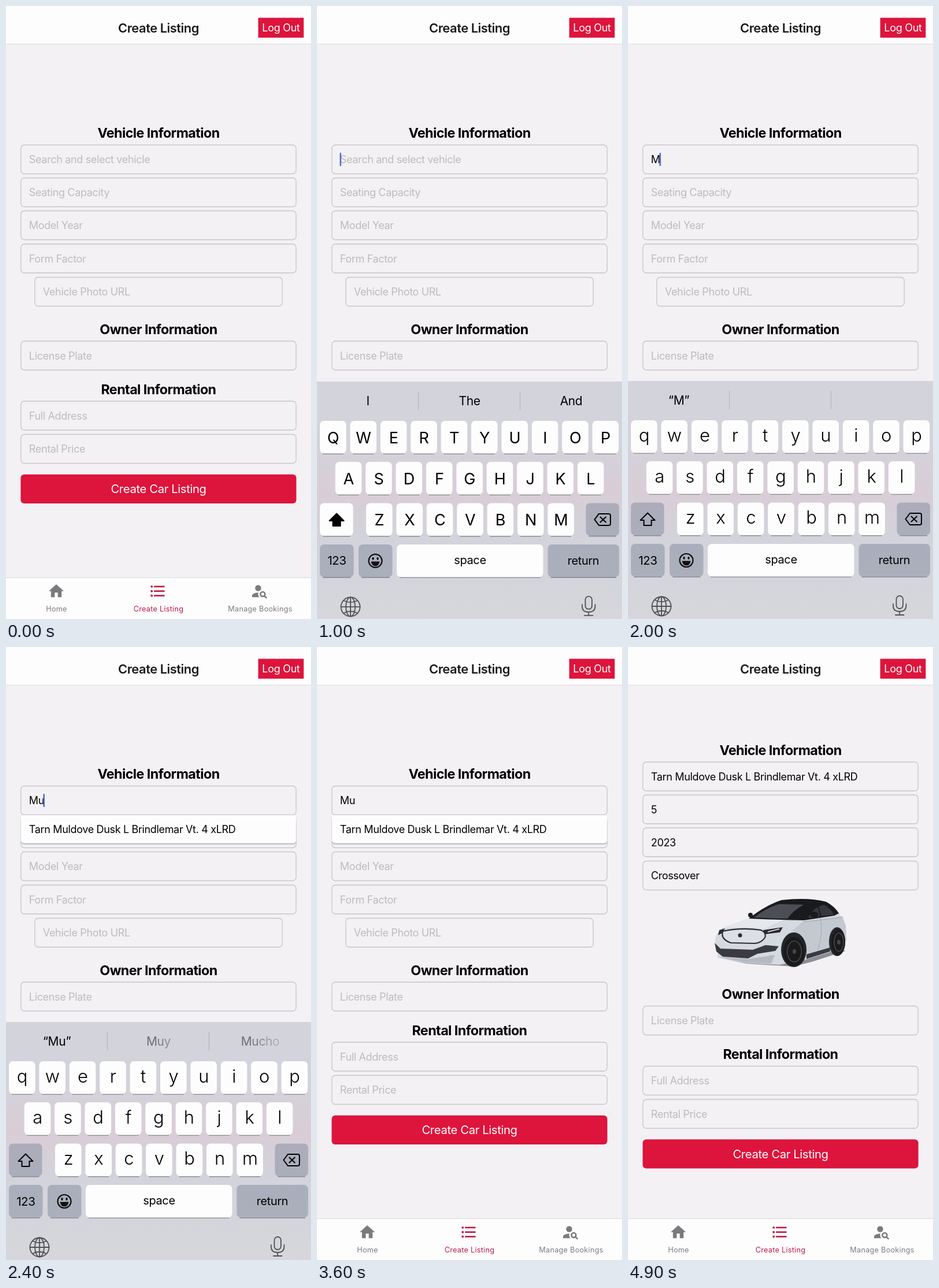
Animation, 528 px wide and 1061 px high, one loop 5000 ms. Source, as an HTML page:

```html
<!DOCTYPE html>
<html lang="en">
<head>
<meta charset="utf-8">
<title>Create Listing</title>
<style>
  html, body { margin: 0; width: 100%; height: 100%; overflow: hidden; background: #f3f1f4; }
  svg { display: block; width: 100vw; height: 100vh; }
  text { font-family: Inter, "Liberation Sans", sans-serif; letter-spacing: -.019em; white-space: pre; }
  .title { font-weight: 600; letter-spacing: -.022em; }
  .head { font-weight: 700; letter-spacing: -.025em; }
  .tab { letter-spacing: .02em; }
  .small { font-weight: 350; }
</style>
</head>
<body>
<svg id="stage" viewBox="0 0 528 1061"></svg>
<script>
const LOOP = 5000, KB_IN = 546.5, TYPE_M = 1450, TYPE_U = 2250, KB_OUT = 3050, PICK = 3800;
const KB_TOP = 649, KB_HEIGHT = 412;
const RED = '#dd143c', ACTIVE = '#bd1a42', GREY = '#7b7a7e';
const CAR = 'Tarn Muldove Dusk L Brindlemar Vt. 4 xLRD';

const clamp = v => Math.max(0, Math.min(1, v));
// Critically damped spring: 1 at the start, settling to 0
const spring = ms => { const p = Math.max(0, ms) * .01826; return (1 + p) * Math.exp(-p); };

const text = (x, y, s, size, attrs = '') => `<text x="${x}" y="${y}" font-size="${size}" ${attrs}>${s}</text>`;
const mid = (x, y, s, size, attrs = '') => text(x, y, s, size, `text-anchor="middle" ${attrs}`);
const rect = (x, y, w, h, fill, r = 0, attrs = '') =>
  `<rect x="${x}" y="${y}" width="${w}" height="${h}" rx="${r}" fill="${fill}" ${attrs}/>`;
const path = (d, fill, attrs = '') => `<path d="${d}" fill="${fill}" ${attrs}/>`;
const line = (d, color, width, attrs = '') => path(d, 'none', `stroke="${color}" stroke-width="${width}" ${attrs}`);
const circle = (x, y, r, fill, attrs = '') => `<circle cx="${x}" cy="${y}" r="${r}" fill="${fill}" ${attrs}/>`;
const oval = (x, y, rx, ry, fill, attrs = '') => `<ellipse cx="${x}" cy="${y}" rx="${rx}" ry="${ry}" fill="${fill}" ${attrs}/>`;
const move = (x, y, s, scale = 1) => `<g transform="translate(${x} ${y}) scale(${scale})">${s}</g>`;

const heading = (y, s) => mid(264, y, s, 23.3, 'class="head"');

function field(y, hint, value = '', inset = 0) {
  const x = 25.8 + inset;
  return rect(x, y + .5, 476.4 - inset * 2, 50, 'none', 6, 'stroke="#c6c5c9" stroke-width="1.3"') +
    text(x + 14, y + 32, value || hint, 18, `fill="${value ? '#000' : '#bcbbbf'}"`);
}

function header() {
  return rect(0, 0, 528, 66, '#fefdfe') + rect(0, 65.5, 528, 1, '#dad9dc') +
    mid(264, 45.7, 'Create Listing', 21.9, 'class="title" fill="#1b1b1d"') +
    rect(436.6, 20.4, 78.8, 34.4, RED) + mid(476, 44.2, 'Log Out', 18.1, 'fill="#fff"');
}

function tabBar() {
  const home = path('M10 20v-6h4v6h5v-8h3L12 3 2 12h3v8z', GREY);
  const list = [6, 12, 18].map(y => circle(4, y, 1.5, ACTIVE) + rect(7, y - 1, 14, 2, ACTIVE)).join('');
  const person = circle(10, 8, 4, GREY) +
    path('M10.4 14C7.6 13.9 2 15.3 2 18v2h9.5c-2.4-2.8-1.2-5.9-1.1-6z', GREY) +
    circle(16, 16, 3, 'none', `stroke="${GREY}" stroke-width="2"`) +
    line('M18.2 18.2L21.3 21.3', GREY, 2);
  return rect(0, 989, 528, 72, '#fefdfe') + rect(0, 989, 528, 1, '#dad9dc') +
    move(71.3, 997, home, 1.31) + move(247, 997, list, 1.31) + move(423.4, 997, person, 1.31) +
    [[87.5, 'Home', GREY], [264, 'Create Listing', ACTIVE], [440, 'Manage Bookings', GREY]]
      .map(([x, s, c]) => mid(x, 1048.3, s, 12.7, `class="tab" fill="${c}"`)).join('');
}

function car() {
  const wheel = (x, y, rx, ry) => oval(x, y, rx, ry, '#1a1a1d') +
    oval(x + 1, y, rx * .68, ry * .72, 'none', 'stroke="#46464b" stroke-width="1.6"') + oval(x + 1, y, 3, 4, '#46464b');
  return path('M154 537L205 548L286 553L318 545L377 526L350 520z', '#8d8d94') +
    path('M151 509Q151 494 165 486L211 469Q240 444 266 438Q312 433 343 441Q362 452 371 470L377 482L378 508L371 520L350 528L308 541L262 550L205 547L156 538z', '#d5d9e0') +
    path('M165 487L211 469L272 472Q254 478 236 488Q196 483 165 487z', '#e5e8ed') +
    path('M304 474L371 466L377 482L378 508L371 520L308 540Q310 498 284 492z', '#c4c9d1') +
    path('M309 532L350 520V527L309 540z', '#3a3b40') +
    line('M304 476L371 468M333 469Q338 495 329 524', '#a4aab3', 1) +
    path('M209 470Q238 447 266 438Q312 433 343 441Q358 449 365 461L357 465L305 473Q250 472 209 470z', '#191a1d') +
    path('M218 468Q242 450 262 445L304 446Q286 456 276 470Q246 470 218 468z', '#4b4f55') +
    path('M312 469Q320 451 339 446Q350 452 357 463z', '#34373c') +
    line('M329 449L334 467', '#191a1d', 2) +
    path('M164 492Q196 485 230 490Q240 494 237 503Q231 512 219 513L178 512Q160 506 164 492z', '#dce0e6',
      'stroke="#2b2c30" stroke-width="2.2"') +
    path('M234 490L268 485L263 494L238 497zM158 490L168 487L163 495L156 499z', '#2b2c30') +
    line('M242 493L262 488', '#f7f8fa', 1.6) +
    path('M150 512L160 522L216 524L238 516L261 518L255 526L224 531L208 539L164 536L153 527z', '#393b40') +
    path('M157 537L208 540L254 533L248 548L205 546z', '#b5b9c1') +
    oval(287, 524, 22, 30, '#242529') + wheel(287, 527, 18, 25) +
    oval(362, 510, 14, 25, '#242529') + wheel(364, 511, 12, 22) +
    oval(322, 463, 7, 5, '#191a1d') + oval(212, 464, 4, 4, '#191a1d') +
    circle(194, 499, 3.5, '#2b2c30');
}

function form(t) {
  const picked = t >= PICK, shift = picked ? 41.5 : 0;
  const typed = picked ? CAR : t >= TYPE_U ? 'Mu' : t >= TYPE_M ? 'M' : '';
  const set = s => picked ? s : '';
  const top = heading(228, 'Vehicle Information') +
    field(240, 'Search and select vehicle', typed) +
    field(297, 'Seating Capacity', set('5')) +
    field(354, 'Model Year', set('2023')) +
    field(411.5, 'Form Factor', set('Crossover'));
  const rest = heading(567.5, 'Owner Information') + field(579.5, 'License Plate') +
    heading(671.5, 'Rental Information') + field(683.5, 'Full Address') + field(741, 'Rental Price') +
    rect(25.4, 810.7, 477.2, 50.2, RED, 6) + mid(264, 843.3, 'Create Car Listing', 20.3, 'fill="#fff"');
  let out = move(0, -shift, top) + move(0, shift, rest) +
    (picked ? car() : field(469, 'Vehicle Photo URL', '', 24));
  if (t >= TYPE_U && !picked)
    out += rect(25.4, 292, 477.2, 50, '#c5c4c8', 6) + rect(25.8, 291, 476.4, 48.5, '#fefdfe', 5) + text(39.8, 322, CAR, 18);
  if (t >= KB_IN && t < KB_OUT)
    out += rect(typed.length < 1 ? 39.5 : typed.length < 2 ? 54.5 : 64.5, 254, 2.4, 23, '#4c64d4', 1);
  return out;
}

// Suggestions fade letter by letter
function suggestions(t) {
  const word = (x, s, alpha) => mid(x, 41, [...s].map((c, i) =>
    `<tspan fill-opacity="${clamp(alpha(i, s.length)).toFixed(2)}">${c}</tspan>`).join(''), 21);
  const all = (words, alpha) => words.map((s, i) => word(88 + 176 * i, s, alpha)).join('');
  let out = line('M175.5 17V49M351.5 17V49', '#b7b8be', 1.2);
  if (t < 1800) out += all(['I', 'The', 'And'], (i, n) => 1 - (t - 1500 - (n - 1 - i) * 100) / 200);
  else if (t < TYPE_U) out += word(88, '“M”', () => (t - 1800) / 150);
  else out += word(88, '“Mu”', () => 1) +
    move(176, 0, all(['Muy', 'Mucho'], i => (t - 2280 - i * 20) / 250));
  return out;
}

function keyboard(t) {
  const offset = KB_HEIGHT * (t < KB_OUT ? spring(t - KB_IN) : 1 - spring(t - KB_OUT));
  if (t < KB_IN || offset > KB_HEIGHT - 1) return '';
  const upper = t < TYPE_M, dark = 'rgba(120,130,150,.45)', rowY = [68, 139, 210.5, 282];
  const key = (x, w, row, fill = '#fefdfe') =>
    line(`M${x + 5} ${rowY[row] + 57.2}H${x + w - 5}`, '#8b8c92', 1.6) + rect(x, rowY[row], w, 56.6, fill, 7);
  let out = suggestions(t);
  ['qwertyuiop', 'asdfghjkl', 'zxcvbnm'].forEach((letters, row) => [...letters].forEach((c, i) => {
    const x = [5, 31.7, 85][row] + i * 52.4;
    out += key(x, 45.6, row) + (upper
      ? mid(x + 22.8, rowY[row] + 39, c.toUpperCase(), 27)
      : mid(x + 22.8, rowY[row] + 36.5, c, 31, 'class="small"'));
  }));
  out += key(5, 57.5, 2, upper ? '#fefdfe' : dark) + key(465.5, 57.5, 2, dark) +
    path('M34 228.5L46.5 241H40.5V250H27.5V241H21.5z', upper ? '#000' : 'none',
      'stroke="#000" stroke-width="2" stroke-linejoin="round"') +
    line('M488 229H505Q508 229 508 232V246Q508 249 505 249H488L480.5 239zM490.5 234.5L500 243.5M500 234.5L490.5 243.5',
      '#000', 2, 'stroke-linejoin="round" stroke-linecap="round"');
  out += key(5, 58.5, 3, dark) + key(72, 58.5, 3, dark) + key(138, 253.5, 3) + key(399.5, 123.5, 3, dark) +
    mid(34.3, 317.5, '123', 20.5) + mid(265, 316, 'space', 20) + mid(461, 317, 'return', 20) +
    circle(101, 310.5, 11.5, 'none', 'stroke="#111" stroke-width="2.2"') +
    oval(97, 306.5, 1.7, 2.4, '#111') + oval(105, 306.5, 1.7, 2.4, '#111') +
    path('M93.5 311.5H108.5Q107 319.5 101 319.5T93.5 311.5z', '#111');
  out += `<g fill="none" stroke="#4f5157" stroke-width="1.8" stroke-linecap="round">
    <circle cx="58" cy="390" r="16.5"/><ellipse cx="58" cy="390" rx="8" ry="16.5"/>
    <path d="M58 373.5V406.5M41.5 390H74.5M46 379Q58 385.5 70 379M46 401Q58 394.5 70 401"/>
    <rect x="464.5" y="372" width="11.5" height="22" rx="5.7"/>
    <path d="M459 386V389Q459 399 470.2 399T481.5 389V386M470.2 399V405M463 405H477.5"/></g>`;
  const top = KB_TOP + offset;
  return rect(0, top, 528, 1061 - top, 'url(#tint)') + move(0, top, out);
}

// The red button glows faintly through the keyboard
const tint = `<defs><linearGradient id="tint" gradientUnits="userSpaceOnUse" x1="0" y1="649" x2="0" y2="1061">
  <stop offset=".25" stop-color="#d2d3db"/><stop offset=".46" stop-color="#d9cdd6"/>
  <stop offset=".67" stop-color="#d2d3db"/><stop offset="1" stop-color="#d6d6dc"/></linearGradient></defs>`;

const stage = document.getElementById('stage');
const fixed = tint + rect(0, 0, 528, 1061, '#f3f1f4') + header() + tabBar();
let last = '';

function draw() {
  const t = performance.now() % LOOP, scene = fixed + form(t) + keyboard(t);
  if (scene !== last) stage.innerHTML = last = scene;
  requestAnimationFrame(draw);
}
draw();
</script>
</body>
</html>
```
